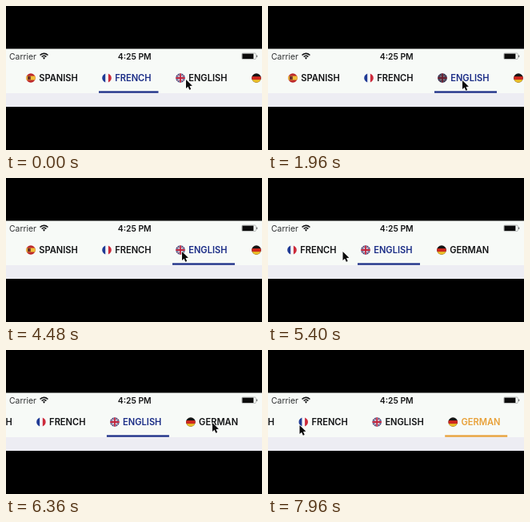
Animation, 320 px wide and 180 px high, one loop 8000 ms. Source, as an HTML page with a canvas:

```html
<!DOCTYPE html>
<html lang="en">
<head>
<meta charset="utf-8">
<title>Language tabs</title>
<style>
html, body { margin: 0; width: 100%; height: 100%; overflow: hidden; background: #000; }
canvas { display: block; width: 100vw; height: 100vh; }
</style>
</head>
<body>
<canvas id="stage"></canvas>
<script>
const canvas = document.getElementById('stage');
const ctx = canvas.getContext('2d');
const LOOP = 8000;
const BAR = '#f7faf7', STRIP = '#ededf3';
const INK = [17, 18, 20], BLUE = [26, 44, 134], AMBER = [232, 160, 56];

// x is the left edge of the selection line; the flag and label are inset from it
const tabs = [
  { label: 'SPANISH', x: 21, w: 78, tint: BLUE, flag: spain },
  { label: 'FRENCH', x: 116, w: 74.5, tint: BLUE, flag: france },
  { label: 'ENGLISH', x: 208, w: 78, tint: BLUE, flag: britain },
  { label: 'GERMAN', x: 303, w: 78, tint: AMBER, flag: germany }
];
const FRENCH = 1, ENGLISH = 2, GERMAN = 3;

// time, x, y
const pointerPath = [
  [0, 225, 92], [40, 225, 92], [600, 243, 93], [2040, 243, 93],
  [3200, 178, 92], [3520, 178, 92], [4400, 220, 92], [4500, 220, 92],
  [5280, 93.5, 92], [5500, 93.5, 92], [6320, 258, 91], [7260, 258, 91],
  [7920, 39.5, 94], [8000, 39.5, 94]
];
const scrollPath = [[0, 0], [4500, 0], [5280, 96], [5540, 96]];
const switches = [
  { at: 640, from: FRENCH, to: ENGLISH },
  { at: 7000, from: ENGLISH, to: GERMAN }
];
const presses = [[560, 680, ENGLISH], [1960, 2120, ENGLISH], [6920, 7040, GERMAN]];

const clamp = v => Math.max(0, Math.min(1, v));
const smooth = v => v * v * (3 - 2 * v);
const mix = (a, b, p) => a + (b - a) * p;
const mixColor = (a, b, p) => a.map((v, i) => mix(v, b[i], p));
const rgb = c => `rgb(${c.map(Math.round).join(',')})`;

function along(path, t) {
  let i = 1;
  while (i < path.length - 1 && path[i][0] < t) i++;
  const a = path[i - 1], b = path[i];
  const p = smooth(clamp((t - a[0]) / (b[0] - a[0])));
  return a.slice(1).map((v, k) => mix(v, b[k + 1], p));
}

function scrollAt(t) {
  if (t > 5540) return 81.8 + 14.2 * Math.exp(-(t - 5540) / 210);
  return along(scrollPath, t)[0];
}

function selectionAt(t) {
  const s = t < 4000 ? switches[0] : switches[1];
  return { from: s.from, to: s.to, p: smooth(clamp((t - s.at) / 360)) };
}

function rect(color, x, y, w, h) {
  ctx.fillStyle = color;
  ctx.fillRect(x, y, w, h);
}

function text(str, x, y, font, color, align = 'left') {
  ctx.font = `${font} Inter, Roboto, sans-serif`;
  ctx.fillStyle = color;
  ctx.textAlign = align;
  ctx.fillText(str, x, y);
}

function line(color, width, ...points) {
  ctx.strokeStyle = color;
  ctx.lineWidth = width;
  ctx.beginPath();
  points.forEach(([x, y], i) => i ? ctx.lineTo(x, y) : ctx.moveTo(x, y));
  ctx.stroke();
}

// Flags are drawn around 0,0 inside a circle of radius 5.8
function spain() {
  rect('#bd282b', -6, -6, 12, 12);
  rect('#efc03a', -6, -2.5, 12, 5);
  rect('#6e3028', -4, -2.2, 3.8, 4.2);
}

function france() {
  rect('#f4f5f8', -6, -6, 12, 12);
  rect('#1f3a94', -6, -6, 4.2, 12);
  rect('#cc2a3a', 1.9, -6, 4.1, 12);
}

function britain() {
  rect('#222c68', -6, -6, 12, 12);
  for (const [color, width] of [['#dcdce8', 1.5], ['#c03048', 0.5]]) {
    line(color, width, [-6, -6], [6, 6]);
    line(color, width, [6, -6], [-6, 6]);
  }
  for (const [color, width] of [['#ececf2', 3], ['#c0243c', 1.8]]) {
    line(color, width, [-6, 0], [6, 0]);
    line(color, width, [0, -6], [0, 6]);
  }
}

function germany() {
  rect('#141414', -6, -6, 12, 12);
  rect('#d0281e', -6, -1.9, 12, 4);
  rect('#efbe28', -6, 2.1, 12, 4);
}

function drawFlag(tab, x, dimmed) {
  ctx.save();
  ctx.translate(x, 90);
  ctx.beginPath();
  ctx.arc(0, 0, 5.8, 0, Math.PI * 2);
  ctx.clip();
  tab.flag();
  if (dimmed) rect('rgba(20,20,28,.5)', -6, -6, 12, 12);
  ctx.restore();
}

function drawStatus() {
  text('Carrier', 4, 66.8, '400 10.4px', '#303234');
  text('4:25 PM', 160.7, 66.8, '600 10.4px', '#141516', 'center');

  ctx.strokeStyle = '#141516';
  ctx.lineWidth = 1.6;
  for (const r of [3.9, 6.8]) {
    ctx.beginPath();
    ctx.arc(47.5, 66.2, r, -Math.PI * 0.76, -Math.PI * 0.24);
    ctx.stroke();
  }
  ctx.fillStyle = '#141516';
  ctx.beginPath();
  ctx.moveTo(47.5, 66.8);
  ctx.arc(47.5, 66.2, 2.1, -Math.PI * 0.76, -Math.PI * 0.24);
  ctx.fill();

  ctx.strokeStyle = '#a4a7a6';
  ctx.lineWidth = 0.7;
  ctx.beginPath();
  ctx.roundRect(294.8, 59, 17.6, 7.6, 1.4);
  ctx.stroke();
  rect('#0c0c0c', 295.4, 59.6, 14, 6.4);
  rect('#55585a', 313.2, 61.5, 1, 2.6);
}

function drawTabs(t) {
  const scroll = scrollAt(t);
  const { from, to, p } = selectionAt(t);
  tabs.forEach((tab, i) => {
    const x = tab.x - scroll;
    const active = i === to ? p : i === from ? 1 - p : 0;
    const dimmed = presses.some(([a, b, k]) => k === i && t >= a && t < b);
    drawFlag(tab, x + 10, dimmed);
    text(tab.label, x + 20.2, 94, '600 11.1px', rgb(mixColor(INK, tab.tint, active)));
  });
  const a = tabs[from], b = tabs[to];
  rect(rgb(mixColor(a.tint, b.tint, p)),
    mix(a.x, b.x, p) - scroll, 106.4, mix(a.w, b.w, p), 2.3);
}

function drawPointer(t) {
  const [x, y] = along(pointerPath, t);
  ctx.save();
  ctx.translate(x, y);
  ctx.scale(0.94, 0.94);
  ctx.beginPath();
  [[0, 0], [0, 11.6], [2.7, 9.2], [4.6, 13.6], [6.6, 12.7], [4.8, 8.5], [8.4, 8.3]]
    .forEach(([px, py]) => ctx.lineTo(px, py));
  ctx.closePath();
  ctx.lineJoin = 'round';
  ctx.lineWidth = 1.2;
  ctx.strokeStyle = '#fff';
  ctx.stroke();
  ctx.fillStyle = '#0b0b0b';
  ctx.fill();
  ctx.restore();
}

function resize() {
  const dpr = window.devicePixelRatio || 1;
  canvas.width = Math.round(innerWidth * dpr);
  canvas.height = Math.round(innerHeight * dpr);
}

function draw(t) {
  ctx.setTransform(canvas.width / 320, 0, 0, canvas.height / 180, 0, 0);
  rect('#000', 0, 0, 320, 180);
  rect(BAR, 0, 53.5, 320, 55.5);
  rect(STRIP, 0, 109, 320, 17);
  drawStatus();
  drawTabs(t);
  drawPointer(t);
}

const start = performance.now();
function tick() {
  draw((performance.now() - start) % LOOP);
  requestAnimationFrame(tick);
}

addEventListener('resize', resize);
resize();
tick();
</script>
</body>
</html>
```
